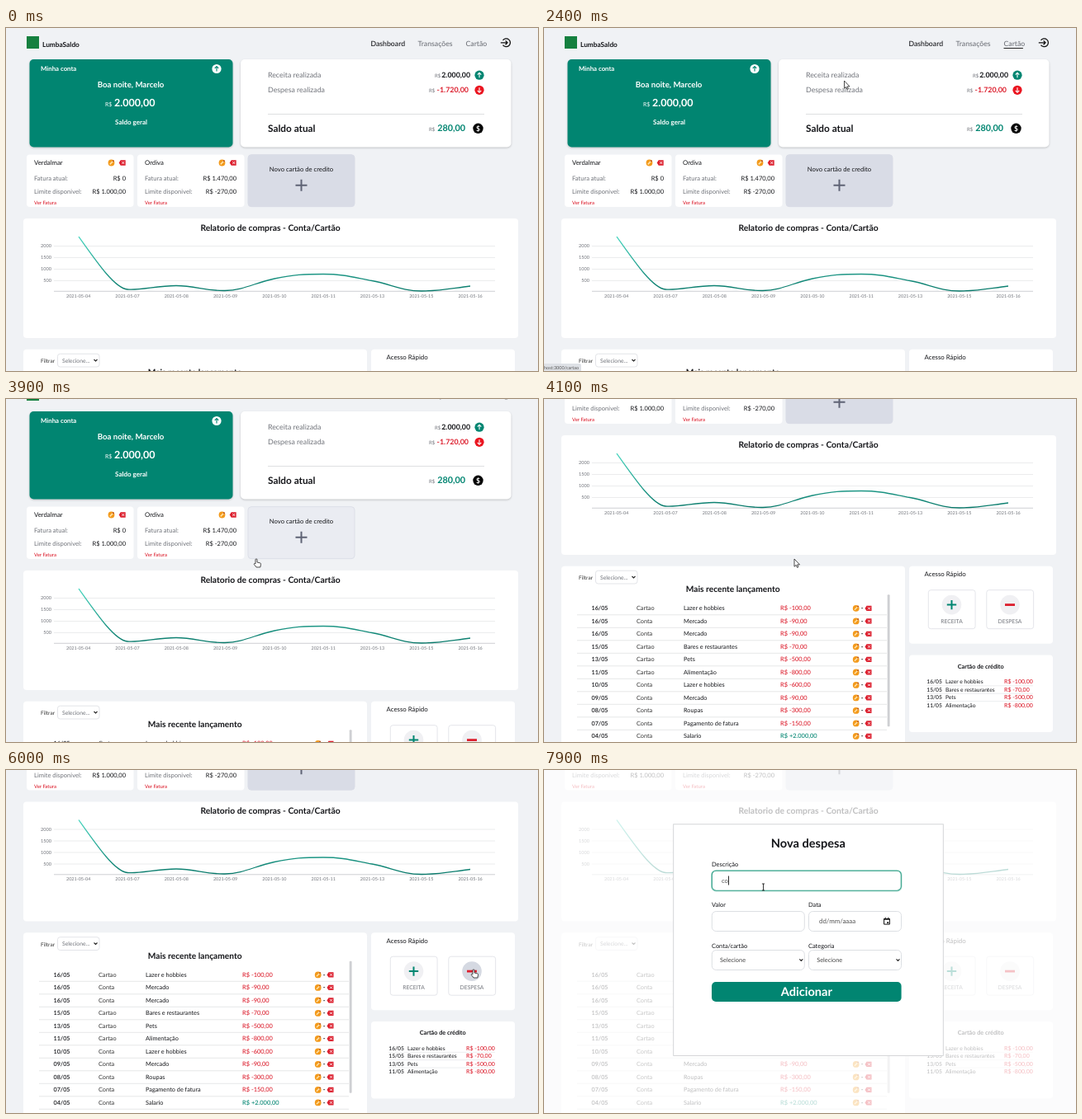
Animation, 644 px wide and 416 px high, one loop 8 s. Source, as an HTML page:

```html
<!DOCTYPE html>
<html lang="pt-BR">
<head>
<meta charset="utf-8">
<title>Painel</title>
<style>
html, body { margin: 0; width: 100%; height: 100%; overflow: hidden; background: #f0f2f5; }
svg { display: block; width: 100vw; height: 100vh; }
text { font-family: Lato, "Open Sans", sans-serif; text-rendering: geometricPrecision; white-space: pre; }
.lift { filter: drop-shadow(0 1px 1.2px rgba(0, 0, 0, .2)); }
</style>
</head>
<body>
<svg id="stage" viewBox="0 0 644 416" xmlns="http://www.w3.org/2000/svg"></svg>
<script>
const LOOP = 8000, STEP = 100;
const GREEN = '#018571', RED = '#dc1f2e', INK = '#15161a', GREY = '#70737a';

// drawing helpers
const text = (x, y, s, size, fill = INK, weight = 400, anchor = 'start', id = '') =>
  `<text x="${x}" y="${y}" font-size="${size}" fill="${fill}" font-weight="${weight}" text-anchor="${anchor}"${id && ` id="${id}"`}>${s}</text>`;
const mid = (x, y, s, size, fill, weight) => text(x, y, s, size, fill, weight, 'middle');
const end = (x, y, s, size, fill, weight) => text(x, y, s, size, fill, weight, 'end');
const box = (x, y, w, h, r = 4, fill = '#fff', extra = '') =>
  `<rect x="${x}" y="${y}" width="${w}" height="${h}" rx="${r}" fill="${fill}" ${extra}/>`;
const dot = (x, y, r, fill, extra = '') => `<circle cx="${x}" cy="${y}" r="${r}" fill="${fill}" ${extra}/>`;
const line = (d, color, w = 1, extra = '') =>
  `<path d="${d}" fill="none" stroke="${color}" stroke-width="${w}" ${extra}/>`;
const at = (x, y, body) => `<g transform="translate(${x} ${y})">${body}</g>`;
const rule = (x1, x2, y, color = '#e2e3e6', w = .8) => line(`M${x1} ${y}H${x2}`, color, w);

const arrowDot = (x, y, fill, ink, dir) => dot(x, y, 5.6, fill) +
  at(x, y, line(`M0 ${-3 * dir}V${3 * dir}M-2.3 ${.6 * dir}L0 ${3 * dir}L2.3 ${.6 * dir}`, ink, 1.1));
const edit = (x, y) => at(x, y, dot(0, 0, 3.9, '#f39a1c') +
  line('M-1.8 1.9L2.2 -2.1', '#ffe2a8', 1.5) + line('M1.7 -1.6L3 -2.9', '#b5481c', 1.5));
const erase = (x, y) => at(x, y, `<path d="M-4 0L-2 -3.2H4V3.2H-2Z" fill="${RED}"/>` +
  line('M-.5 -1.5L2.5 1.5M2.5 -1.5L-.5 1.5', '#fff', .9));
const chevron = (x, y, s = 1) => line(`M${x - 2 * s} ${y - s}l${2 * s} ${2 * s}l${2 * s} ${-2 * s}`, '#222', 1.1);

const NAV = [[441.5, 'Dashboard', 42, INK], [498.5, 'Transações', 43, GREY], [556.5, 'Cartão', 26, GREY]];

function header() {
  return box(25, 10, 15, 15, 0, '#15803f') +
    text(44, 23, 'LumbaSaldo', 8.3, INK, 700) +
    NAV.map(([x, s, , c]) => text(x, 21.5, s, 8.7, c, 500)).join('') +
    NAV.map(([x], i) => `<rect id="under${i}" x="${x}" y="24" width="0" height="1" fill="#222"/>`).join('') +
    line('M601.5 15A4.9 4.9 0 1 1 601.5 20.6M598.8 17.8H607M604.6 15.4L607 17.8L604.6 20.2', '#111', 1.3);
}

function account() {
  return `<g class="lift">${box(28.5, 38, 246, 106.5, 5, GREEN)}</g>` +
    text(42, 51.5, 'Minha conta', 7.8, '#fff', 700) +
    arrowDot(255, 49.5, '#fff', GREEN, -1) +
    mid(151, 71.5, 'Boa noite, Marcelo', 9.65, '#fff', 700) +
    text(120, 95, 'R$', 6.9, '#fff') + text(131, 95.3, '2.000,00', 12.5, '#fff', 700) +
    mid(151.5, 117, 'Saldo geral', 8, '#fff', 700);
}

function balance() {
  const amount = (x, y, s, size, fill, signX) => text(signX, y, 'R$', 6, GREY) + end(x, y, s, size, fill, 700);
  return `<g class="lift">${box(284, 38, 327.5, 106.5, 5)}</g>` +
    text(317, 60, 'Receita realizada', 8.8, GREY) +
    text(317, 78, 'Despesa realizada', 8.8, GREY) +
    amount(562, 60, '2.000,00', 8.8, INK, 519) + arrowDot(573, 57.2, GREEN, '#fff', -1) +
    amount(560, 78, '-1.720,00', 8.9, RED, 512) + arrowDot(573, 75.3, '#ea1520', '#fff', 1) +
    rule(317, 579, 104.5, '#d6d7da') +
    text(317, 125.5, 'Saldo atual', 11.8, INK, 700) +
    amount(556, 125, '280,00', 10.8, GREEN, 512) +
    dot(571.5, 121.8, 6.2, '#050505') + mid(571.5, 124.8, '$', 8.5, '#fff', 700);
}

function bankCard(x, name, bill, limit) {
  return box(x, 153.5, 129.5, 63.5) +
    text(x + 9, 166, name, 7.8) + edit(x + 102.5, 163.5) + erase(x + 115.7, 163.5) +
    text(x + 9, 184.5, 'Fatura atual:', 7.6, GREY) + end(x + 120, 184.5, bill, 7.5) +
    text(x + 9, 201, 'Limite disponivel:', 7.55, GREY) + end(x + 120, 201, limit, 7.5) +
    text(x + 9, 214, 'Ver Fatura', 6, RED, 500);
}

function newCard() {
  return `<rect id="add" x="293" y="153.7" width="129" height="63" rx="4"/>` +
    mid(357.5, 173.7, 'Novo cartão de credito', 7.7) +
    line('M350.5 190.7h14M357.5 183.7v14', '#5f6375', 2);
}

function chart() {
  const days = ['04', '07', '08', '09', '10', '11', '13', '15', '16'];
  const curve = 'M88 253C112 287 132 315.5 147 317S183 312.5 206 312.5S242 319 265 318.5' +
    'S301 309 325 304S360 298.5 384 298.5S419 302 443 306.5S480 319 503 319S538 316 562 313';
  return box(21, 231, 599, 145) +
    mid(320, 245.7, 'Relatorio de compras - Conta/Cartão', 10.35, INK, 700) +
    [2000, 1500, 1000, 500].map((v, i) =>
      rule(58, 592, 264.5 + 14 * i, '#e6e7e9', .8) + end(55, 266.4 + 14 * i, v, 5.6, GREY)).join('') +
    rule(58, 592, 319.3, '#c9cbce', .9) +
    days.map((d, i) => mid(87.7 + 59.3 * i, 326.6, '2021-05-' + d, 5.45, GREY)).join('') +
    line(curve, 'url(#fade)', 1.3);
}

const ROWS = [
  ['16/05', 'Cartao', 'Lazer e hobbies', '-100,00'], ['16/05', 'Conta', 'Mercado', '-90,00'],
  ['16/05', 'Conta', 'Mercado', '-90,00'], ['15/05', 'Cartao', 'Bares e restaurantes', '-70,00'],
  ['13/05', 'Cartao', 'Pets', '-500,00'], ['11/05', 'Cartao', 'Alimentação', '-800,00'],
  ['10/05', 'Conta', 'Lazer e hobbies', '-600,00'], ['09/05', 'Conta', 'Mercado', '-90,00'],
  ['08/05', 'Conta', 'Roupas', '-300,00'], ['07/05', 'Conta', 'Pagamento de fatura', '-150,00'],
  ['04/05', 'Conta', 'Salario', '+2.000,00']
];

function table() {
  return box(21, 389.7, 416, 260) +
    text(42, 406.2, 'Filtrar', 6.5, '#333') +
    box(62.5, 395.2, 50.5, 15.8, 3, '#fff', 'stroke="#dcdee2" stroke-width=".8"') +
    text(68, 405.9, 'Selecione...', 6.8, GREY) + chevron(108.5, 403) +
    mid(228.7, 421, 'Mais recente lançamento', 10.2, INK, 700) +
    ROWS.map(([day, kind, what, sum], i) => {
      const y = 443.4 + 15.5 * i;
      return text(57.5, y, day, 7.2, INK, 600) + text(112, y, kind, 7.3, '#333') + text(169, y, what, 7.3) +
        text(286, y, 'R$ ' + sum, 7.45, sum[0] === '+' ? GREEN : RED, 500) +
        edit(377.7, y - 2.5) + text(383.7, y, '-', 7.5, INK, 700) + erase(392.5, y - 2.5) +
        rule(40, 415, y + 5.4, '#dcdddf', .7);
    }).join('') +
    box(415.7, 424.3, 2.9, 160, 1, '#cfd0d3');
}

function quick() {
  const button = (x, label, sign, id) => box(x, 418.7, 56.8, 47, 3, '#fff', 'stroke="#e1e3e8" stroke-width=".9"') +
    dot(x + 28.2, 436.6, 11.8, '#f0f0f3', `id="${id}"`) + at(x + 28.2, 436.6, sign) +
    mid(x + 28.2, 458.7, label, 6.75, GREY);
  return box(442, 389.7, 174, 94) + text(460.5, 402, 'Acesso Rápido', 7.85) +
    button(465.3, 'RECEITA', line('M-5.7 0H5.7M0 -5.7V5.7', GREEN, 2), 'income') +
    button(535.8, 'DESPESA', line('M-6 0H6', RED, 2.8), 'expense');
}

function credit() {
  return box(442, 497.6, 174, 93.5) + mid(528.7, 513.8, 'Cartão de crédito', 7.25, INK, 700) +
    ROWS.filter(r => r[1] === 'Cartao').map(([day, , what, sum], i) => {
      const y = 532.4 + 9.4 * i;
      return text(463.3, y, day, 6.7, INK, 500) + text(486, y, what, 6.7) +
        text(557, y, 'R$ ' + sum, 7, RED, 500) + (i < 3 ? rule(463, 592, y + 2.4, '#e0e1e4', .6) : '');
    }).join('');
}

function modal() {
  const field = (x, y, w, h = 24) => box(x, y, w, h, 5, '#fff', 'stroke="#d9dce0" stroke-width=".9"');
  const label = (x, y, s) => text(x, y, s, 7.45);
  const pick = x => field(x, 218.5, 112) + text(x + 9.7, 232.8, 'Selecione', 7.4, '#444') + chevron(x + 108, 230.4);
  return box(156.7, 65.8, 326.6, 280.6, 0, '#fff', 'stroke="#cfd1d3" stroke-width=".9"') +
    mid(319.8, 94.2, 'Nova despesa', 14.6, INK, 700) +
    label(203, 116.5, 'Descrição') + field(203.3, 122.2, 229) +
    `<g id="focus">${box(203.3, 122.2, 229, 24, 5, 'none', 'stroke="#b9e2d8" stroke-width="2.6"')}` +
    `${box(203.3, 122.2, 229, 24, 5, '#fff', 'stroke="#2f9f87" stroke-width="1.1"')}</g>` +
    text(215, 136.5, '', 7.6, '#555', 400, 'start', 'typed') +
    `<rect id="caret" y="128.5" width=".9" height="11" fill="#111"/>` +
    label(203, 165.7, 'Valor') + label(320, 165.7, 'Data') +
    field(203.3, 171.5, 112) + field(320.5, 171.5, 112) +
    text(333, 186.3, 'dd/mm/aaaa', 7.9, '#555') +
    line('M411.6 180.5h6.8v6.6h-6.8zM413.2 178.7v2M416.8 178.7v2', '#111', 1) +
    box(411.6, 180, 6.8, 1.7, 0, '#111') + box(415.3, 184.2, 1.9, 1.9, 0, '#111') +
    label(203, 215.5, 'Conta/cartão') + label(320, 215.5, 'Categoria') +
    pick(203.3) + pick(320.5) +
    box(203, 257, 229.6, 24, 5, GREEN) + mid(317.8, 274, 'Adicionar', 14.6, '#fff', 700);
}

const POINTERS = {
  arrow: '<path d="M0 0V9.3L2.1 7.4L3.5 10.4L4.9 9.8L3.6 6.9H6.5Z" fill="#fff" stroke="#222" stroke-width=".8"/>',
  hand: '<path d="M-1 .8C-1 -.4 1 -.4 1 .8V4L4.6 4.9C5.4 5.1 5.6 5.8 5.5 6.5L4.8 10H0L-2.7 6.5C-3 5.6 -2 5 -1 6Z" fill="#fff" stroke="#222" stroke-width=".8"/>',
  beam: line('M-1.6 -4H1.6M0 -4V4M-1.6 4H1.6', '#222', .9)
};

document.getElementById('stage').innerHTML =
  `<defs><linearGradient id="fade" gradientUnits="userSpaceOnUse" x1="0" y1="253" x2="0" y2="319">
    <stop offset="0" stop-color="#4ad6c0"/><stop offset="1" stop-color="#08796a"/></linearGradient></defs>` +
  box(0, 0, 644, 416, 0, '#f0f2f5') +
  `<g id="page">${header() + account() + balance() +
    bankCard(25, 'Verdalmar', 'R$ 0', 'R$ 1.000,00') + bankCard(159, 'Ordiva', 'R$ 1.470,00', 'R$ -270,00') +
    newCard() + chart() + table() + quick() + credit()}</g>` +
  `<g id="status">${box(-3, 407, 48, 12, 2, '#dee1e6', 'id="bubble"') + text(0, 414, '', 5.5, '#555', 400, 'start', 'link')}</g>` +
  `<g id="dialog">${box(0, 0, 644, 416, 0, '#fff', 'opacity=".73"') + modal()}</g>` +
  '<g id="pointer">' + Object.entries(POINTERS).map(([k, v]) => `<g id="${k}">${v}</g>`).join('') + '</g>';

// motion
const $ = id => document.getElementById(id);
const set = (id, name, value) => $(id).setAttribute(name, value);
const show = (id, on) => set(id, 'visibility', on ? 'visible' : 'hidden');
const within = (t, a, b) => t >= a && t < b;

// linear interpolation through [time, ...values]
function track(keys, t) {
  if (t <= keys[0][0]) return keys[0].slice(1);
  const i = keys.findIndex(k => k[0] > t);
  if (i < 0) return keys[keys.length - 1].slice(1);
  const a = keys[i - 1], b = keys[i], p = (t - a[0]) / (b[0] - a[0]);
  return a.slice(1).map((v, n) => v + (b[n + 1] - v) * p);
}
const pulse = (t, a, b, up = 200, down = up) => track([[a, 0], [a + up, 1], [b, 1], [b + down, 0]], t)[0];
const blend = (a, b, p) => `rgb(${a.map((v, i) => Math.round(v + (b[i] - v) * p))})`;

const SCROLL = [[3700, 0], [3800, 4], [3900, 23], [4000, 110], [4100, 187], [4200, 191], [4300, 192], [4600, 192], [4700, 192.5]];
const PATH = [
  [100, 113, 184], [200, 257, 80], [300, 257, 80], [400, 275, 72], [600, 380, 40], [800, 450, 25], [1100, 480, 20],
  [1200, 480, 20], [1600, 525, 19.5], [1900, 565, 19], [2100, 574, 19], [2300, 574, 19], [2400, 363.5, 64],
  [2600, 345, 140], [2900, 312, 180], [3200, 303, 194], [4500, 303, 194], [4600, 284.5, 201], [4900, 360, 270],
  [5200, 470, 300], [5400, 524, 297], [5600, 548, 268], [5800, 562, 246], [6000, 566, 242],
  [6400, 566, 242], [6700, 380, 170], [6900, 265.5, 142]
];
const HOVERS = [[700, 1400], [1500, 1700], [1800, 2380]];

function draw(t) {
  set('page', 'transform', `translate(0 ${-track(SCROLL, t)[0]})`);

  HOVERS.forEach(([a, b], i) => set('under' + i, 'width', NAV[i][2] * pulse(t, a, b)));
  const link = t < 1500 ? '' : t < 1800 ? 'transacoes' : 'cartao';
  show('status', within(t, 700, 2500));
  $('link').textContent = 'host:3000/' + link;
  set('bubble', 'width', link ? (link.length > 6 ? 58 : 48) : 30);

  const lit = pulse(t, 2600, 3900);
  set('add', 'fill', blend([217, 220, 230], [234, 236, 242], lit));
  set('add', 'stroke', blend([217, 220, 230], [220, 223, 232], lit));
  set('expense', 'fill', blend([240, 240, 243], [213, 217, 226], pulse(t, 5500, 6300)));

  set('dialog', 'opacity', pulse(t, 6100, LOOP, 300));
  show('dialog', t > 6100);
  set('focus', 'opacity', pulse(t, 6700, LOOP));
  const typed = 'co'.slice(0, t < 7700 ? 0 : t < 7900 ? 1 : 2);
  $('typed').textContent = typed;
  set('caret', 'x', 215 + 4 * typed.length);
  $('caret').style.display = within(t, 6900, 7400) || t >= 7700 ? '' : 'none';

  const [x, y] = track(PATH, t);
  const kind = t >= 6800 ? 'beam'
    : within(t, 700, 2400) || within(t, 2700, 4000) || within(t, 5600, 6300) ? 'hand' : 'arrow';
  set('pointer', 'transform', `translate(${x} ${y})`);
  $('pointer').style.display = t < 100 ? 'none' : '';
  for (const k in POINTERS) show(k, k === kind);
}

const start = performance.now();
function tick() {
  const t = (performance.now() - start) % LOOP;
  draw(Math.floor(t / STEP) * STEP);
  requestAnimationFrame(tick);
}
tick();
</script>
</body>
</html>
```
